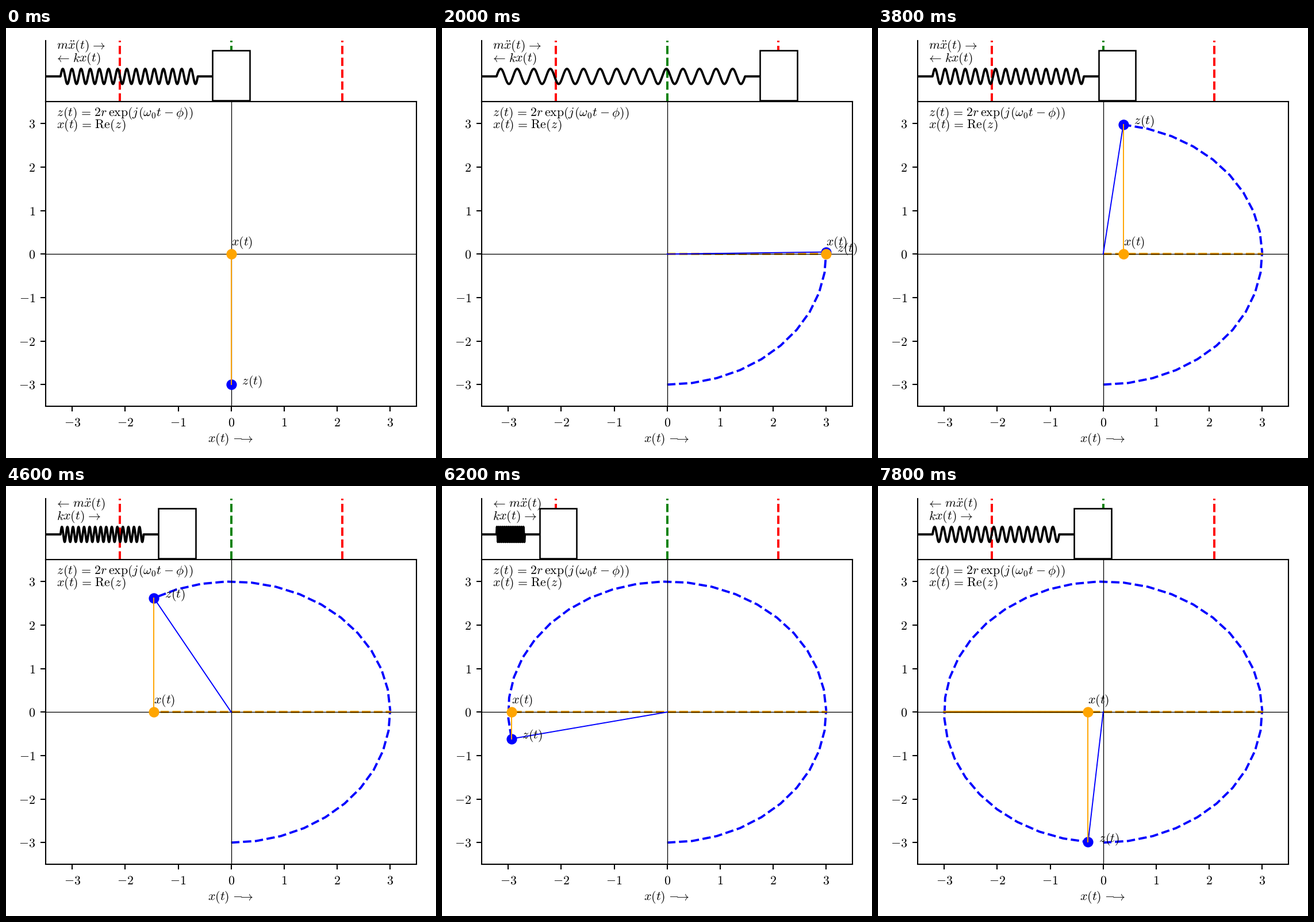
Write a matplotlib script that moves like this. It is 748 by 748 pixels and loops after 8 s.

```python
import numpy as np
import matplotlib.pyplot as plt
from matplotlib.animation import FuncAnimation
from matplotlib.patches import Rectangle

SIZE, DPI = 748, 187
FRAMES, INTERVAL = 40, 200
STEP = 5 * np.pi / 99          # phase advance per frame
R = 3
COILS, LEAD = 15, 0.4
SPRING_Y, SPRING_AMP = 84.2, 13.2

plt.rcParams.update({
    "mathtext.fontset": "cm",
    "font.size": 8.45,
    "xtick.labelsize": 8.45,
    "ytick.labelsize": 8.45,
    "text.hinting": "none",
})

fig = plt.figure(figsize=(SIZE / DPI, SIZE / DPI), dpi=DPI, facecolor="white")


def axes_px(left, top, right, bottom):
    return fig.add_axes([left / SIZE, 1 - bottom / SIZE,
                         (right - left) / SIZE, (bottom - top) / SIZE])


def text_px(x, y, s):
    return fig.text(x / SIZE, 1 - y / SIZE, s)


# Spring and mass; the vertical unit is one pixel
top = axes_px(69, 22.3, 714.4, 128.3)
top.set(xlim=(-5, 5), ylim=(128.3, 22.3), xticks=[], yticks=[])
top.spines[["top", "right"]].set_visible(False)
for pos, color in ((-R, "red"), (0, "green"), (R, "red")):
    top.axvline(pos, ls="--", color=color, lw=1.5)
spring, = top.plot([], [], color="black", lw=1.5)
mass = Rectangle((-0.5, 39), 1, 87.4, fc="white", ec="black", lw=1, zorder=3)
top.add_patch(mass)

# Complex plane
ax = axes_px(69, 128.3, 714.4, 658.2)
ticks = range(-3, 4)
labels = [f"${v}$" for v in ticks]
ax.set(xlim=(-3.5, 3.5), ylim=(-3.5, 3.5))
ax.set_xticks(ticks, labels)
ax.set_yticks(ticks, labels)
z_trail, = ax.plot([], [], "--", color="blue", lw=1.5)
x_trail, = ax.plot([], [], "--", color="orange", lw=1.5)
ax.axhline(0, color="black", lw=0.5)
ax.axvline(0, color="black", lw=0.5)
radius, = ax.plot([], [], color="blue", lw=0.75)
z_dot, = ax.plot([], [], "o", color="blue")
x_dot, = ax.plot([], [], "o", color="orange")
drop, = ax.plot([], [], color="orange", lw=0.75)

# Small kerns bring the math spacing up to that of TeX
REL = r"\hspace{0.12}"
Z = r"z\hspace{0.05}"
EQ = REL + "=" + REL
LEFT = r"\hspace{-0.2}\leftarrow" + REL
RIGHT = REL + r"\rightarrow"
INERTIA, FORCE = r"m\ddot{x}(t)", "kx(t)"

text_px(87.5, 154, f"${Z}(t){EQ}" + r"2r\hspace{0.03}\,\exp(j\hspace{0.06}"
        r"(\omega_0t\hspace{0.05}-\hspace{0.05}\phi))$")
text_px(87.5, 175, f"$x(t){EQ}" + r"\mathrm{Re}(" + Z + ")$")
text_px(351, 721, r"$x(t)\hspace{0.316}{-}\hspace{-0.39}\rightarrow$")
inertia = text_px(87.5, 37, "")
force = text_px(87.5, 59, "")
x_label = ax.text(0, 0.2, "$x(t)$")
z_label = ax.text(0, 0, f"${Z}(t)$")


def coil(end):
    """Spring outline from the wall to the mass."""
    u = np.linspace(0, 1, 900)
    a, b = -5 + LEAD, end - LEAD
    x = np.concatenate(([-5], a + (b - a) * u, [end]))
    y = np.concatenate(([0], np.sin(2 * np.pi * COILS * u), [0]))
    return x, SPRING_Y - SPRING_AMP * y


def update(i):
    phase = STEP * np.arange(i + 1)
    xs, ys = R * np.sin(phase), -R * np.cos(phase)
    x, y = xs[-1], ys[-1]

    spring.set_data(*coil(x - 0.5))
    mass.set_x(x - 0.5)
    if x >= 0:
        inertia.set_text(f"${INERTIA}{RIGHT}$")
        force.set_text(f"${LEFT}{FORCE}$")
    else:
        inertia.set_text(f"${LEFT}{INERTIA}$")
        force.set_text(f"${FORCE}{RIGHT}$")

    z_trail.set_data(xs, ys)
    x_trail.set_data(xs, np.zeros_like(xs))
    radius.set_data([0, x], [0, y])
    drop.set_data([x, x], [0, y])
    z_dot.set_data([x], [y])
    x_dot.set_data([x], [0])
    x_label.set_x(x)
    z_label.set_position((x + 0.2, y))
    return ()


anim = FuncAnimation(fig, update, frames=FRAMES, interval=INTERVAL,
                     init_func=lambda: update(0), repeat=True)
plt.show()
```
